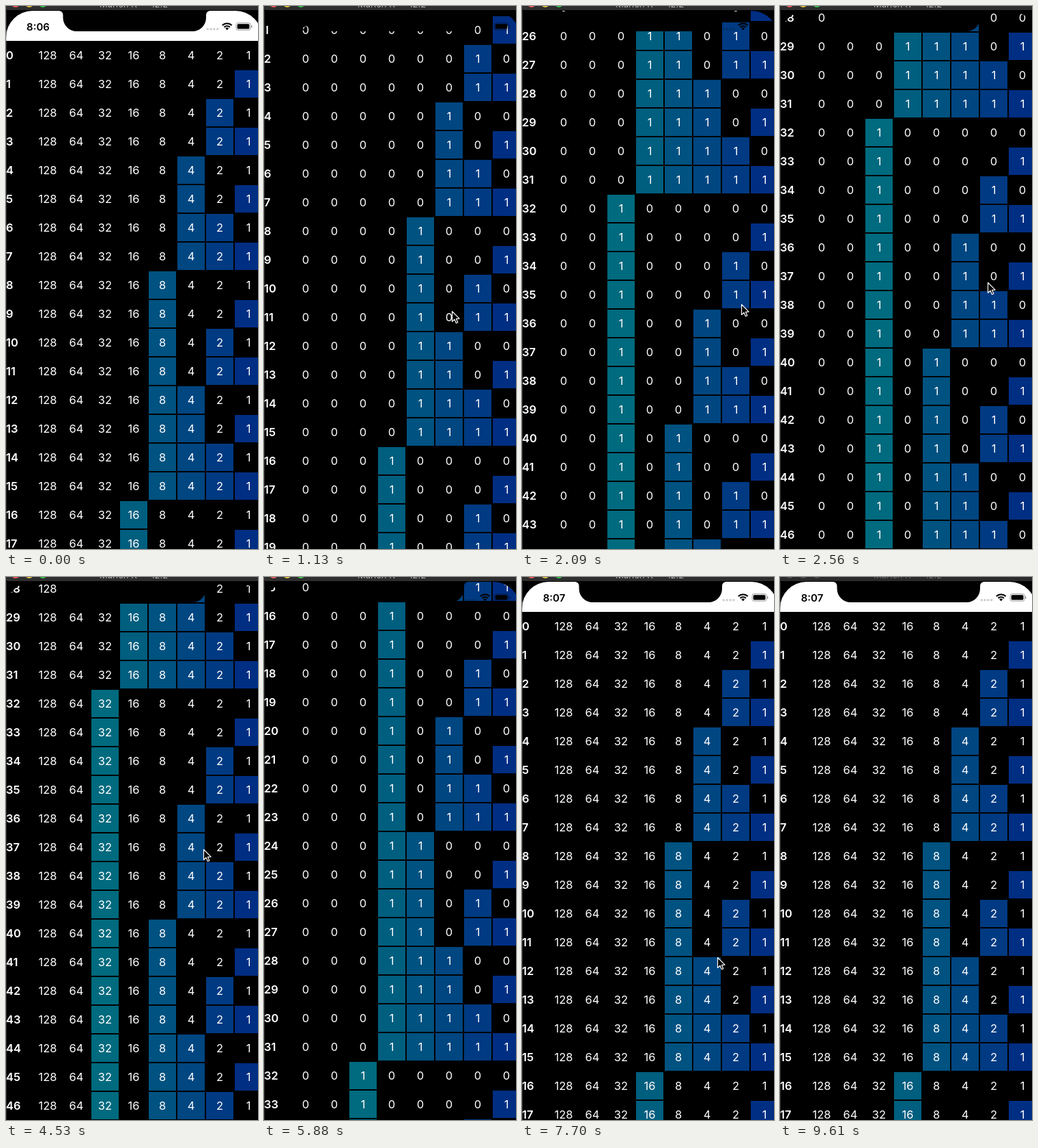
Recreate the animation shown at these times as an HTML page with a canvas. Size 369 px wide and 794 px high, loop 9.65 s.

```html
<!DOCTYPE html>
<html lang="en">
<head>
<meta charset="utf-8">
<title>Binary table</title>
<style>
html, body { margin: 0; width: 100%; height: 100%; overflow: hidden; background: #000; }
canvas { display: block; width: 369px; height: 794px; }
</style>
</head>
<body>
<canvas id="stage"></canvas>
<script>
const W = 369, H = 794, LOOP = 9650;
const TOP = 7, SCREEN_W = 375, BAR = 44, ROW = 42, CELL = 40;
const FONT = 'Inter, "Liberation Sans", sans-serif';
const DIGITS = 16.5;
const TAU = 460;       // scroll inertia, ms
const SPRING = 0.011;  // bounce stiffness, 1/ms
const STEP = 60;       // the picture advances in steps of this many ms

const canvas = document.getElementById('stage');
const ctx = canvas.getContext('2d');
const dpr = window.devicePixelRatio || 1;
canvas.width = W * dpr;
canvas.height = H * dpr;

const hold = t => t - (t + STEP - 35) % STEP;

// A swipe follows the finger from `start` to `release`, then coasts towards `end`.
// `at` is the offset reached at time `when` while coasting.
const up = { start: 1010, release: 1355, from: 0, when: 1475, at: 640, end: 1298.7 };
const down = { start: 5250, release: 5830, from: 1231, when: 5855, at: 687, end: -231.8 };
const STOP = 2555, EDGE = 6488.5;

function coast(s, t) {
  return s.end + (s.at - s.end) * Math.exp((s.when - t) / TAU);
}

function swipe(s, t) {
  if (t <= s.start) return s.from;
  if (t >= s.release) return coast(s, t);
  const to = coast(s, s.release), span = s.release - s.start;
  const power = (s.end - to) / TAU * span / (to - s.from);
  return s.from + (to - s.from) * Math.pow((t - s.start) / span, power);
}

function bounce(t) {
  const u = t - EDGE;
  return down.end / TAU * u * Math.exp(-SPRING * u);
}

function scrollAt(t) {
  if (t < STOP) return swipe(up, t);
  return t < EDGE ? swipe(down, t) : bounce(t);
}

const showsBits = t => (t >= 950 && t < 3570) || (t >= 4770 && t < 7530);

// Pointer moves: begin, finish, x, y of the tip
const MOVES = [
  [470, 770, 272, 502], [1010, 1475, 297, 70], [1475, 2075, 321, 436],
  [2075, 2500, 304, 404], [2980, 3210, 289, 398], [5010, 5250, 286, 340],
  [5250, 5830, 276, 830], [6650, 6930, 254, 554], [7570, 7820, 374, 562]
];

function pointerAt(t) {
  let x = 374, y = 510;
  for (const [begin, finish, toX, toY] of MOVES) {
    const k = Math.min(1, Math.max(0, (t - begin) / (finish - begin)));
    const e = k * k * (3 - 2 * k);
    x += (toX - x) * e;
    y += (toY - y) * e;
  }
  return [Math.round(x), Math.round(y)];
}

function rect(x, y, w, h, color) {
  ctx.fillStyle = color;
  ctx.fillRect(x, y, w, h);
}

function disc(x, y, r, color) {
  ctx.fillStyle = color;
  ctx.beginPath();
  ctx.arc(x, y, r, 0, 7);
  ctx.fill();
}

function text(str, x, y, size, weight, color, align) {
  ctx.font = `${weight} ${size}px ${FONT}`;
  ctx.textAlign = align;
  ctx.fillStyle = color;
  ctx.fillText(str, x, y);
}

function drawTitleBar(active) {
  rect(0, 0, W, 6, active ? '#2f2f30' : '#2b2b2c');
  const lights = active ? ['#fc5b57', '#e5bf3c', '#35c84a'] : ['#505050', '#505050', '#505050'];
  lights.forEach((c, i) => disc(14 + 20 * i, -4, 6, c));
  text('Marlen K — 12.2', 187, 1.5, 13, 400, active ? '#b4b4b4' : '#6c6c6c', 'center');
}

function drawTable(scroll, bits) {
  const first = Math.max(0, Math.floor((scroll - BAR) / ROW));
  for (let n = first; n < 256; n++) {
    const y = TOP + BAR + n * ROW - scroll;
    if (y > H) break;
    text(n, 0, y + 27, DIGITS, 600, '#fff', 'left');
    for (let b = 0; b < 8; b++) {
      const x = 335 - ROW * b;
      const on = n >> b & 1;
      if (on) rect(x, y + 1, CELL, CELL, `rgb(0,${46 + 12 * b},${131 - b})`);
      text(bits ? on : 1 << b, x + CELL / 2, y + 27, DIGITS, 400, '#fff', 'center');
    }
  }
}

function drawWifi(x, y) {
  ctx.strokeStyle = '#000';
  for (const [r, w] of [[9.7, 2.2], [6, 2.1], [1.8, 3.4]]) {
    ctx.lineWidth = w;
    ctx.beginPath();
    ctx.arc(x, y, r, -Math.PI * 0.75, -Math.PI * 0.25);
    ctx.stroke();
  }
}

function drawBattery(x, y) {
  ctx.lineWidth = 1;
  ctx.strokeStyle = 'rgba(0,0,0,.38)';
  ctx.beginPath();
  ctx.roundRect(x, y, 21, 10.6, 2.8);
  ctx.stroke();
  ctx.fillStyle = '#000';
  ctx.beginPath();
  ctx.roundRect(x + 1.6, y + 1.6, 17.8, 7.4, 1.5);
  ctx.fill();
  rect(x + 22, y + 3.4, 1.3, 4, 'rgba(0,0,0,.4)');
}

function drawStatus(clock) {
  text(clock, 47, 35.5, 15, 600, '#000', 'center');
  for (let i = 0; i < 4; i++) disc(295.3 + 4.8 * i, 33.8, 1.7, 'rgba(0,0,0,.2)');
  drawWifi(323.7, 35.2);
  drawBattery(337, 24.6);
}

function drawNotch() {
  const l = 83.5, r = 293, b = TOP + 30;
  ctx.fillStyle = '#000';
  ctx.beginPath();
  ctx.moveTo(l - 6, TOP - 1);
  ctx.lineTo(l - 6, TOP);
  ctx.arcTo(l, TOP, l, TOP + 6, 6);
  ctx.arcTo(l, b, l + 20, b, 20);
  ctx.arcTo(r, b, r, b - 20, 20);
  ctx.arcTo(r, TOP, r + 6, TOP, 6);
  ctx.lineTo(r + 6, TOP - 1);
  ctx.fill();
}

const arrow = new Path2D('M0 0V15L3.5 11.8 5.9 17.2 8.3 16.2 6 10.9 10.6 10.6Z');

function drawPointer(x, y) {
  ctx.save();
  ctx.translate(x + 0.5, y + 0.5);
  ctx.fillStyle = '#000';
  ctx.fill(arrow);
  ctx.lineWidth = 1.2;
  ctx.lineJoin = 'round';
  ctx.strokeStyle = '#fff';
  ctx.stroke(arrow);
  ctx.restore();
}

function draw(t) {
  const held = hold(t);
  const scroll = Math.round(scrollAt(held));
  ctx.setTransform(dpr, 0, 0, dpr, 0, 0);
  rect(0, 0, W, H, '#000');
  drawTitleBar(t < 9610);

  ctx.save();
  ctx.beginPath();
  ctx.roundRect(0, TOP, SCREEN_W, 812, 39);
  ctx.clip();
  rect(0, TOP, SCREEN_W, Math.max(0, BAR - scroll), '#fff');
  drawTable(scroll, showsBits(t));
  drawStatus(t < 2300 ? '8:06' : '8:07');
  ctx.restore();

  drawNotch();
  rect(0, TOP, 1, H, 'rgba(120,120,120,.4)');
  drawPointer(...pointerAt(held));
}

const begin = performance.now();
function loop() {
  draw((performance.now() - begin) % LOOP);
  requestAnimationFrame(loop);
}
loop();
</script>
</body>
</html>
```
